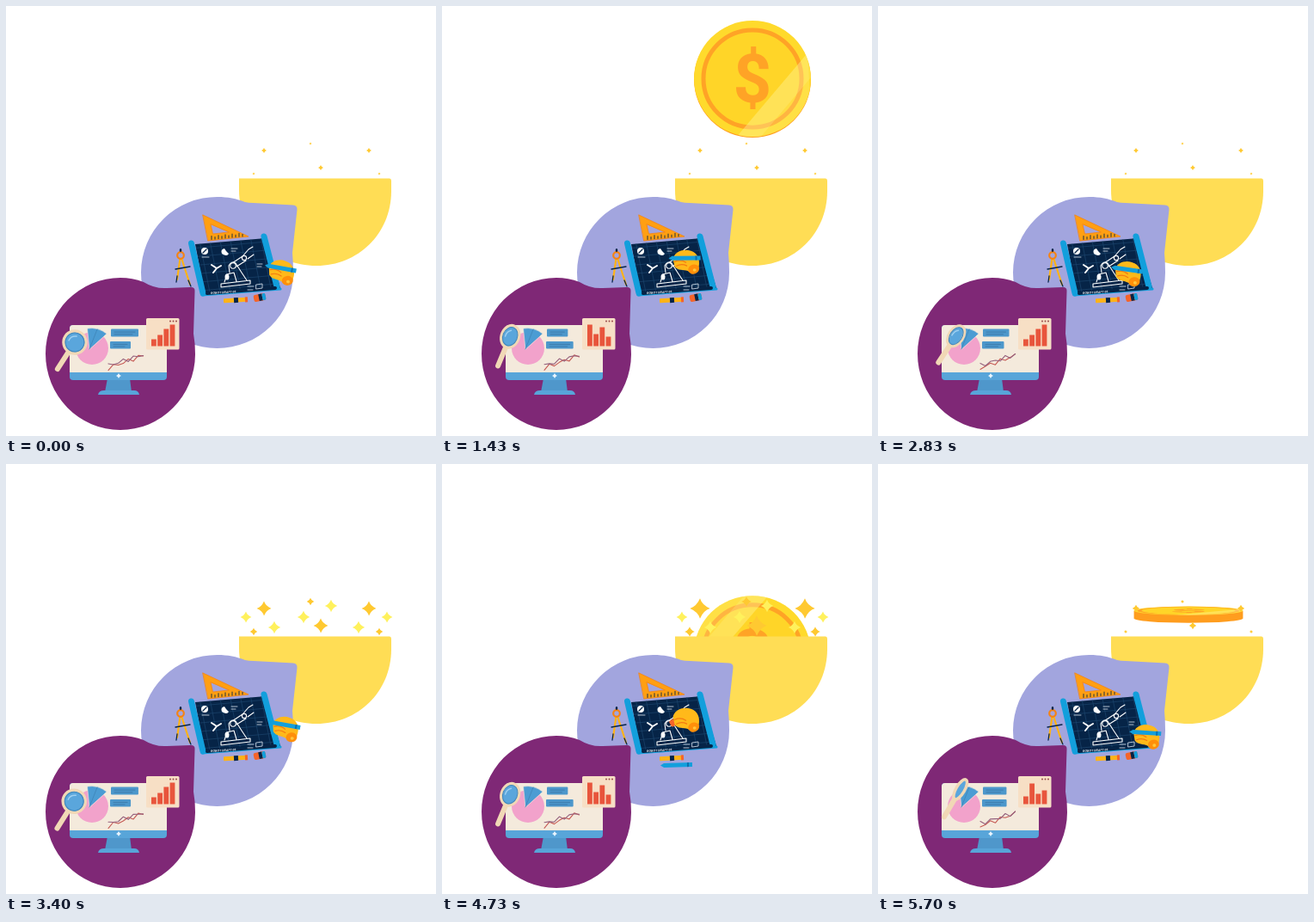
An HTML page with a canvas for the animation above (5.73 s loop, 500x500 px).

```html
<!DOCTYPE html>
<html lang="en">
<head>
<meta charset="utf-8">
<style>
html, body { margin: 0; width: 100%; height: 100%; overflow: hidden; background: #fff; }
canvas { display: block; width: 500px; height: 500px; }
</style>
</head>
<body>
<canvas id="stage"></canvas>
<script>
const LOOP = 5730, CYCLE = 3300, TAU = Math.PI * 2;
const NAVY = '#062447', BLUE = '#129fdc', AMBER = '#ffb317';
const { sin, cos, abs, min, max } = Math;
const canvas = document.getElementById('stage');
const dpr = window.devicePixelRatio || 1;
canvas.width = canvas.height = 500 * dpr;
const c = canvas.getContext('2d');

// Smooth rise and fall around mid, with a short hold at the top.
function bump(t, mid, width) {
  const k = max(0, min(1, 1.5 * (1 - abs(t - mid) / width)));
  return k * k * (3 - 2 * k);
}

function shape(d, fill, stroke, width = 1) {
  const p = new Path2D(d);
  if (fill) { c.fillStyle = fill; c.fill(p, 'evenodd'); }
  if (stroke) {
    c.strokeStyle = stroke;
    c.lineWidth = width;
    c.lineCap = c.lineJoin = 'round';
    c.stroke(p);
  }
}

function oval(x, y, rx, ry, fill, stroke, width, turn = 0) {
  c.beginPath();
  c.ellipse(x, y, rx, ry, turn, 0, TAU);
  if (fill) { c.fillStyle = fill; c.fill(); }
  if (stroke) { c.strokeStyle = stroke; c.lineWidth = width; c.stroke(); }
}

function box(x, y, w, h, fill, r = 0) {
  c.beginPath();
  c.roundRect(x, y, w, h, r);
  c.fillStyle = fill;
  c.fill();
}

function placed(x, y, turn, draw) {
  c.save();
  c.translate(x, y);
  c.rotate(turn);
  draw();
  c.restore();
}

// Coin and sparkles
function face(r) {
  oval(0, 0, r, r, '#ffda2c');
  oval(0, 0, 57, 57, '#ffd528', '#ffa326', 5);
  c.fillStyle = '#ffa326';
  c.font = 'bold 78px Roboto, "Liberation Sans", sans-serif';
  c.textAlign = 'center';
  c.fillText('$', 0, 28);
  c.save();
  c.beginPath();
  c.arc(0, 0, r, 0, TAU);
  c.clip();
  c.globalAlpha = .22;
  shape('M64-30L-20 70H70Z', '#fff3a0');
  shape('M64-30L-20 70H8L70-4Z', '#fff3a0');
  c.restore();
}

// Thrown straight up, turning over as it flies; dt is the time from the top.
function coin(dt) {
  if (abs(dt) > 640) return;
  const tilt = cos((dt - 100) / 215), k = max(abs(tilt), .08);
  const edge = 9 * Math.sqrt(1 - k * k), r = 63 + 5 * k, side = tilt < -.2 ? -1 : 1;
  placed(361, 77 + .000509 * dt * dt, 0, () => {
    oval(0, edge / 2, r, r * k, '#ff9d1e');
    box(-r, -edge / 2, 2 * r, edge, '#ff9d1e');
    c.translate(0, -edge / 2);
    c.scale(side, side * k);
    face(r);
  });
}

function star(x, y, r, fill) {
  if (r < .3) return;
  const a = r * .2, b = r * .34;
  placed(x, y, 0, () => shape(
    `M0 ${-r}Q${a} ${-b} ${r} 0Q${b} ${a} 0 ${r}Q${-a} ${b} ${-r} 0Q${-b} ${-a} 0 ${-r}Z`, fill));
}

function sparkles(t) {
  const gold = 3 + 9 * bump(t % 700, 390, 340), lemon = 7.2 * bump(t % 1400, 670, 600);
  star(366, 188, gold, '#ffc931');
  star(354, 160, gold / 2, '#ffc931');
  star(378, 165, lemon, '#fff15c');
  star(346, 178, lemon, '#fff15c');
  for (const side of [-1, 1]) {
    star(361 + side * 61, 168, gold, '#ffc931');
    star(361 + side * 73, 195, gold / 2, '#ffc931');
    star(361 + side * 82, 178, lemon * .9, '#fff15c');
    star(361 + side * 49, 190, lemon, '#fff15c');
  }
}

// Desk with drawing
function pencil() {
  shape('M-15-2.5H18V2.5H-15L-19 0Z', BLUE);
  box(12, -2.5, 2, 5, '#0b6faf');
}

function eraser() {
  box(-7, -4, 14, 8, '#f4642a', 2);
  box(-1, -4, 4, 8, NAVY);
  box(3, -4, 4, 8, BLUE, 1.5);
}

function hand(t) {
  const a = t / CYCLE * TAU;
  const x = 302 + 3 * cos(a) - 18 * sin(a) + 29 * cos(2 * a - 1.03);
  const y = 304 - 16 * sin(a) + 7 * cos(2 * a - .79);
  const rubbing = t > 3420 && t < 5000;
  placed(x, y, .08 + .1 * cos(a), () => {
    if (rubbing) placed(-12, 2, -.5, eraser);
    shape('M-15-3C-14-10-5-15 3-13C12-12 17-4 15 6C14 14 7 15 2 11C-3 9-9 11-13 6Z', '#ffb91a');
    oval(9, 9, 6.5, 5.5, '#ff8f0a', null, 0, -.3);
    oval(10, 10, 2, 1.8, '#ffc63a');
    shape('M-13 0Q-6-3 0 1M-11 5Q-5 2 1 5', null, '#f37a12', 1.2);
    if (!rubbing) placed(-1, -4, 0, pencil);
  });
  if (rubbing) placed(273, 350, -.03, pencil);
  else placed(295, 339, -.2, eraser);
}

function blueprint() {
  const paper = 'M220 277L302 270L319 328L231 334Z';
  shape(paper, NAVY);
  c.save();
  c.clip(new Path2D(paper));
  for (let i = 0; i < 8; i++) {
    shape(`M${224 + i * 12} 268l14 70M215 ${282 + i * 10}l110-10`, null, '#1c456d', .7);
  }
  c.restore();
  shape('M215.5 276L229 334', null, BLUE, 7);
  shape('M300 268L315 326', null, BLUE, 7);
  shape('M228 336L319 329', null, BLUE, 3);
  shape('M234 334L313 328', null, NAVY, 4);

  oval(231, 285, 4, 4, '#fff');
  shape('M229 287L233 283', null, NAVY, 1.3);
  shape('M228 292H236M262 282H269M262 285H267M292 300H298M292 303H297', null, '#dfe8f1', .8);
  shape('M251 288Q249 283 254 282L256 285L259 288Q257 292 251 288Z', '#fff');
  shape('M281 326H288M281 330H287M291 324L298 323V328L291 329Z', null, '#dfe8f1', .8);
  shape('M239 301L245 305L241 310M245 305L250 302', null, '#fff', 2);
  // robot arm
  shape('M250 323L284 319V323L250 327ZM254 321L257 312L265 310L268 320M260 310L259 302Q262 296 267 299L274 310L280 319', null, '#fff', 1.1);
  shape('M263 299L275 291L279 296L268 303M276 290L282 283L287 280M281 294L288 289', null, '#fff', 1.1);
  oval(264, 302, 3.2, 3.2, NAVY, '#fff', 1.1);
  oval(277, 293, 2.6, 2.6, NAVY, '#fff', 1.1);
  oval(257, 315, 2.5, 3.5, '#fff');
  c.fillStyle = '#fff';
  c.font = 'italic bold 3.4px "Liberation Sans", Arial, sans-serif';
  c.textAlign = 'left';
  placed(238, 335, -.06, () => c.fillText('ROBOT DRAFT 05', 0, 0));
}

function tools() {
  shape('M229 243L282 268L235 273ZM238 254L240.5 265L259 263Z', '#ff9f12', '#f58313', .8);
  for (let i = 0; i < 10; i++) {
    shape(`M${239 + i * 4} ${271.5 - i * .4}v${i % 2 ? -2.5 : -4}`, null, NAVY, .9);
  }
  shape('M203 290L199 318M203 290L214 324', null, AMBER, 2.2);
  shape('M197 306L214 303M199 314L198 321M212 319L215 326', null, NAVY, 1.3);
  oval(203, 290, 3.8, 3.8, '#a2a5de', '#f58313', 2.2);
  oval(203, 284, 1.3, 2, NAVY);
  placed(268, 342, -.06, () => {
    box(-15, -2.5, 28, 5, AMBER, 1);
    box(-3, -3, 5, 6, NAVY);
    box(10, -3, 3, 6, '#f4642a');
  });
}

// Monitor
const RISING = [8, 13, 20, 25], FALLING = [25, 14, 22, 11], MIXED = [9, 24, 12, 16];

function label(x, y, w, h) {
  box(x, y, w, h, '#4c97cb', 1);
  if (w > 10) shape(`M${x + 4} ${y + h * .4}h${w - 8}M${x + 4} ${y + h * .7}h${w - 11}`, null, '#3b79aa', .9);
}

function trend(base, slope, phase, colour) {
  let d = '';
  for (let i = 0; i < 8; i++) {
    d += `${i ? 'L' : 'M'}${119 + i * 5.8} ${base - i * slope + 2.6 * cos(i * 2.5 + phase)}`;
  }
  shape(d, null, colour, 1.1);
}

function magnifier(a) {
  const x = 85 - 6 * sin(a) - 5 * cos(2 * a), y = 386 + 7 * sin(a) + 5 * cos(a);
  const squash = min(1, .8 + .45 * sin(a + .5));
  placed(x, y, -1.08 - .1 * sin(a - 1), () => {
    shape('M-13 0H-37', null, '#f1d8b6', 6);
    oval(0, 0, 13, 13 * squash, '#5aa6dc', '#f1d8b6', 3.5);
    if (squash > .5) {
      oval(0, 0, 11, 11 * squash, null, '#3f86bb', 1);
      shape(`M-2 ${-7 * squash}Q4 ${-8 * squash} 7 ${-2 * squash}`, null, '#9dcff0', 1.5);
    }
  });
}

function monitor(t) {
  const p = t % CYCLE, a = p / CYCLE * TAU;
  shape('M118 433H144L146 449H115Z', '#4f97cb');
  shape('M107 452Q108 447 114 447H149Q154 447 155 452Z', '#58a5d9');
  box(74, 371, 113, 64, '#58a5d9', 4);
  box(74, 371, 113, 55, '#f4eadc', [4, 4, 0, 0]);
  star(131, 430, 3, '#e9f5ff');

  oval(100, 398, 19, 19, '#f2a2cb');
  shape('M97 399L94.5 375Q107 373 117 381Z', '#4c9cd3', '#f4eadc', .6);
  shape('M97 399L106 376', null, '#3f84b6', .8);

  const shut = 1 - .9 * bump(t, 670, 300), swing = 4 * cos(a);
  label(122 + 30 * (1 - shut), 375.5, (28 + swing) * shut, 2 + 7 * shut);
  label(121, 390, 28 - swing, 8.5);
  trend(421, 2.1, 1.2 * sin(a), '#c65b55');
  trend(418, 1.8, 2.5 - sin(a), '#94607d');

  box(163, 363, 38.5, 36.5, '#f7dfc5', 1.5);
  const toFall = bump(p, 1550, 450), toMix = bump(p, 2400, 400);
  for (let i = 0; i < 4; i++) {
    const h = RISING[i] + (FALLING[i] - RISING[i]) * toFall + (MIXED[i] - RISING[i]) * toMix;
    box(169 + i * 7.2, 395.5 - h, 5.8, h, '#e8553c');
    if (i) oval(187.5 + i * 3.5, 366.5, 1, 1, '#9b4b4b');
  }
  magnifier(a);
}

function draw(t) {
  c.setTransform(dpr, 0, 0, dpr, 0, 0);
  c.fillStyle = '#fff';
  c.fillRect(0, 0, 500, 500);
  coin(t - (t < 3000 ? 1305 : 5262));
  shape('M271 200.5H446Q448 200.5 448 203V215C448 265 409 302 361 302C311 302 271 264 271 214Z', '#ffdd55');
  sparkles(t);
  shape('M246 222C258 222 268 224 278 228Q282 229 288 229L334 231.5Q339 232 338.5 237L333 287Q334 298 334 310A88.5 88 0 1 1 246 222Z', '#a2a5de');
  tools();
  blueprint();
  hand(t);
  shape('M133 316Q147 316 160 321Q173 329 187 328L215 327Q220 327 219.5 332L218 381Q220 392 220 405A87 88.5 0 1 1 133 316Z', '#7f2876');
  monitor(t);
}

const start = performance.now();
function tick(now) {
  draw(max(0, now - start) % LOOP);
  requestAnimationFrame(tick);
}
draw(0);
requestAnimationFrame(tick);
</script>
</body>
</html>
```
